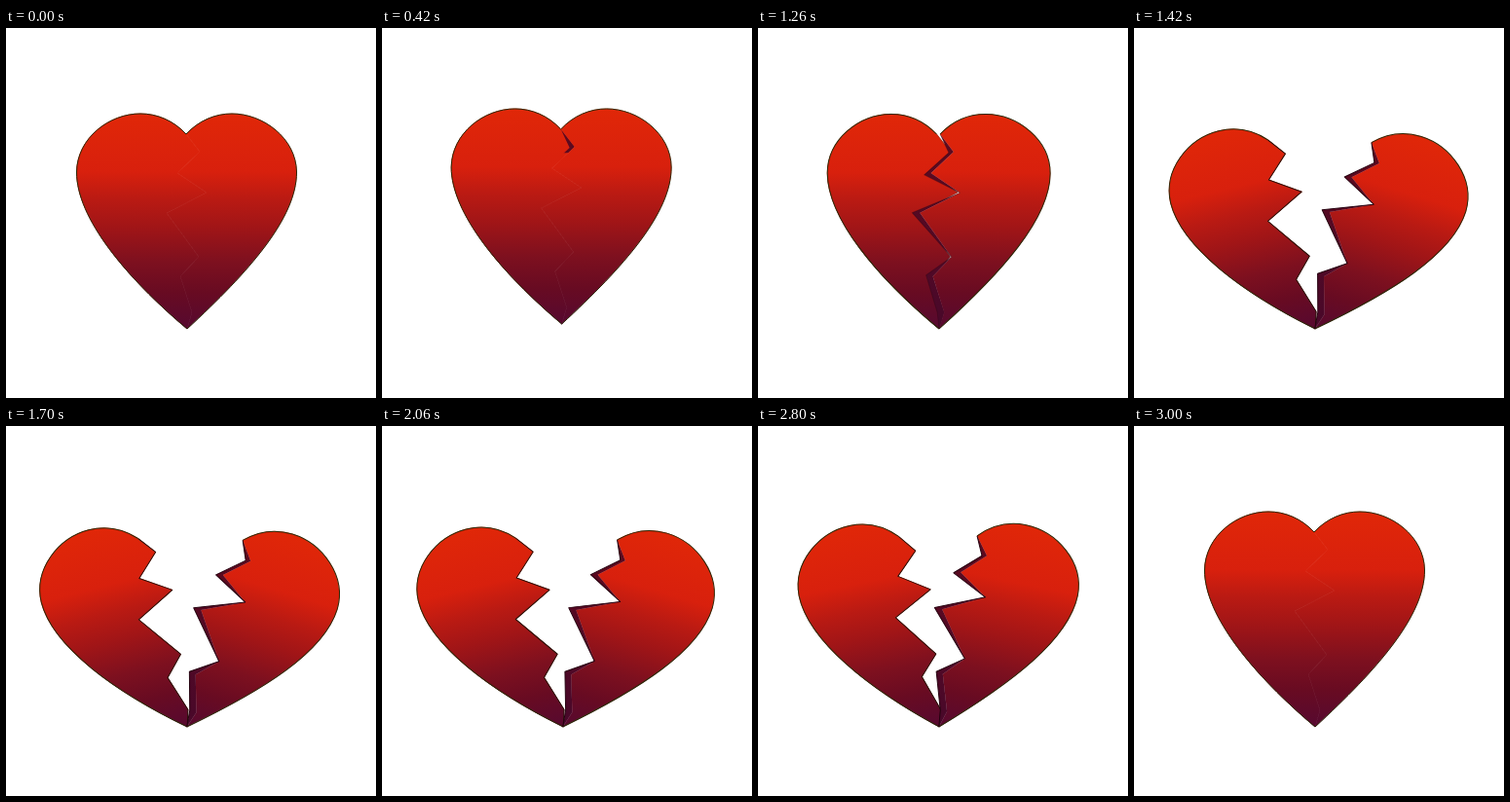
Write an HTML page that moves like this. It is 380 by 380 pixels and loops after 3560 ms.

```html
<!DOCTYPE html>
<html lang="en">
<head>
<meta charset="utf-8">
<title>Breaking heart</title>
<style>
  html, body { margin: 0; width: 100%; height: 100%; overflow: hidden; background: #fff; }
  svg { display: block; width: 100%; height: 100%; }
</style>
</head>
<body>
<svg viewBox="0 0 380 380">
  <defs>
    <linearGradient id="red" gradientUnits="userSpaceOnUse" x1="0" y1="88" x2="0" y2="309">
      <stop offset="0" stop-color="#e02708"/>
      <stop offset=".27" stop-color="#d8200d"/>
      <stop offset=".4" stop-color="#b91a13"/>
      <stop offset=".53" stop-color="#a01517"/>
      <stop offset=".69" stop-color="#7d101f"/>
      <stop offset=".83" stop-color="#680b22"/>
      <stop offset="1" stop-color="#560930"/>
    </linearGradient>
    <linearGradient id="shade" gradientUnits="userSpaceOnUse" x1="0" y1="110" x2="0" y2="309">
      <stop offset="0" stop-color="#5e0a1e"/>
      <stop offset="1" stop-color="#48082a"/>
    </linearGradient>
    <clipPath id="reveal"><rect id="window" x="140" y="100" width="80" height="220"/></clipPath>
  </defs>
  <g id="heart" fill="none" stroke-linejoin="round">
    <g id="left">
      <path id="leftFill" fill="url(#red)" stroke="url(#red)" stroke-width=".8"/>
      <path id="leftRim" stroke="#2b2908"/>
      <path id="leftSeam" stroke="#2b1208"/>
    </g>
    <g id="right">
      <path id="rightFill" fill="url(#red)" stroke="url(#red)" stroke-width=".5"/>
      <path id="rightRim" stroke="#2b2908"/>
      <g clip-path="url(#reveal)">
        <path id="crack" fill="url(#shade)"/>
        <path id="crackEdge" stroke="#24000e"/>
      </g>
    </g>
  </g>
</svg>
<script>
const LOOP = 3560, STEP = 20;
const PIVOT = "186 308";
const el = id => document.getElementById(id);
const draw = (id, d) => el(id).setAttribute("d", d);
const clamp = x => Math.max(0, Math.min(1, x));

const seam = [[185,109],[199,127],[176,149],[206,169],[165,190],[198,235],[179,255],[191,292],[186,309]];
const edge = [[185,109],[194,128],[169,151],[206,169],[157,190],[198,235],[172,254],[184,292],[186,309]];
const leftLobe = "M185 109C172 95 155 88 138 88C106 88 73 113 72.5 148C72.5 195 123 256 186 309";
const rightLobe = "M185 109C198 95 215 88 232 88C264 88 298 113 298.5 148C298.5 195 250 250 186 309";
const line = pts => pts.map(p => p.join(" ")).join("L");
const back = pts => line([...pts].reverse());

// Opening angle of each half in degrees: [time, angle]
const leftKeys = [[1240,0],[1420,13.8],[1600,14.6],[1760,14.3],[1920,14.8],[2060,13.9],
  [2300,14.8],[2500,16.6],[2670,23.4],[2800,11.8],[2840,1.9],[2880,0]];
const rightKeys = [[1240,0],[1420,17.2],[1760,16.9],[2060,16.5],[2500,15.2],
  [2670,22.2],[2800,11.6],[2840,1.9],[2880,0]];

// Monotone cubic through the keys
function curve(keys) {
  const last = keys.length - 1;
  const rate = i => (keys[i + 1][1] - keys[i][1]) / (keys[i + 1][0] - keys[i][0]);
  const slope = i => {
    if (i === 0 || i === last) return 0;
    const a = rate(i - 1), b = rate(i);
    return a * b > 0 ? 2 * a * b / (a + b) : 0;
  };
  return t => {
    if (t <= keys[0][0]) return keys[0][1];
    if (t >= keys[last][0]) return keys[last][1];
    const i = keys.findIndex(k => k[0] > t) - 1;
    const [t0, a] = keys[i], [t1, b] = keys[i + 1];
    const h = t1 - t0, u = (t - t0) / h, v = 1 - u;
    return a * v * v * (1 + 2 * u) + b * u * u * (3 - 2 * u)
      + h * u * v * (slope(i) * v - slope(i + 1) * u);
  };
}
const leftAngle = curve(leftKeys), rightAngle = curve(rightKeys);

// Depth reached by the crack from the top
function crackDepth(t) {
  if (t < 220 || t >= 3000) return 0;
  if (t < 780) return 10 + 56 * clamp((t - 220) / 480);
  return t < 840 ? 136 : 220;
}

function shake(t) {
  const u = clamp((t - 220) / 480), swell = Math.sin(Math.PI * u);
  const x = swell * (2.5 + 4.5 * Math.sin(4 * Math.PI * u));
  const y = -6 * swell * Math.abs(Math.sin(4 * Math.PI * u));
  return `translate(${x.toFixed(2)} ${y.toFixed(2)})`;
}

function render(time) {
  const t = Math.floor((time % LOOP) / STEP) * STEP;
  const l = leftAngle(t), r = rightAngle(t);
  el("heart").setAttribute("transform", shake(t));
  el("left").setAttribute("transform", `rotate(${-l} ${PIVOT})`);
  el("right").setAttribute("transform", `rotate(${r} ${PIVOT})`);

  // The dark side of the break slides shut at the end
  const width = 1 - clamp((t - 2840) / 160);
  const side = edge.map((p, i) => p.map((v, k) => seam[i][k] + (v - seam[i][k]) * width));
  draw("crack", "M" + line(side) + "L" + back(seam) + "Z");
  draw("crackEdge", "M" + line(side));
  el("window").setAttribute("height", crackDepth(t));

  el("leftSeam").setAttribute("opacity", clamp(l / 2));
  el("crackEdge").setAttribute("opacity", clamp(r / 2));
}

draw("leftFill", leftLobe + "L" + back(seam) + "Z");
draw("rightFill", rightLobe + "L" + back(seam) + "Z");
draw("leftRim", leftLobe);
draw("rightRim", rightLobe);
draw("leftSeam", "M" + line(seam));

const start = performance.now();
function tick() {
  render(performance.now() - start);
  requestAnimationFrame(tick);
}
render(0);
requestAnimationFrame(tick);
</script>
</body>
</html>
```
